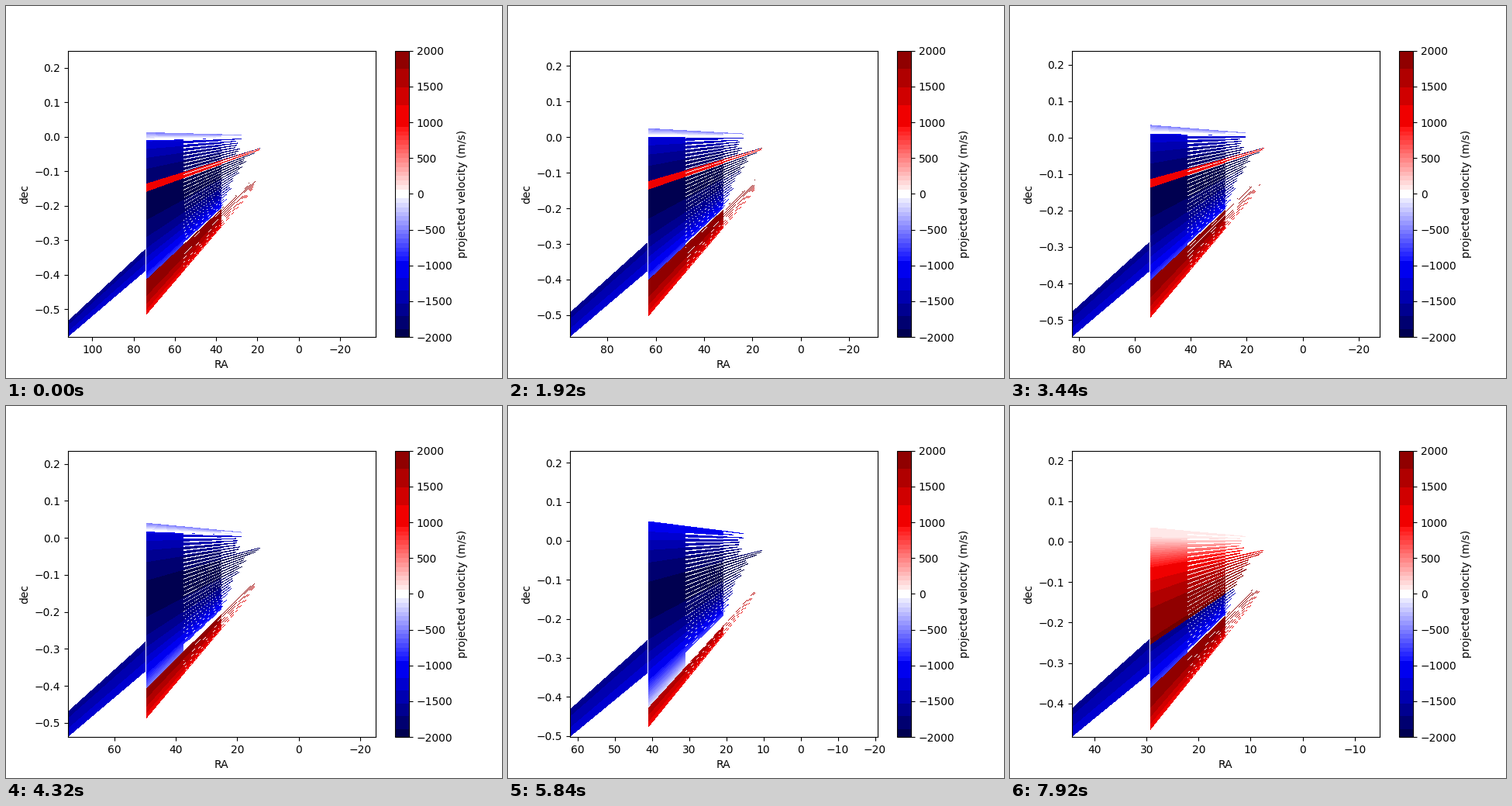
A matplotlib script that plays this animation: 640 by 480 pixels, repeating every 8000 ms.

```python
import numpy as np
import matplotlib.pyplot as plt
from matplotlib.animation import FuncAnimation
from matplotlib.cm import ScalarMappable
from matplotlib.colors import ListedColormap, Normalize

FRAMES, INTERVAL = 100, 80
DRIFT = 0.00052      # upward drift of every ray slope per frame
SPACING = 0.0147     # slope between neighbouring rays
Q_TOP, Q_BOTTOM = 0.012, -0.5215
LONGEST = -0.145     # slope of the ray that reaches furthest in
COLS, ROWS = 397, 370


def stepped_color(v):
    """Blue-white-red map with coarse colour steps."""
    t = abs(v) / 1000
    if t < 0.9375:
        weak = np.floor(255 * (1 - t) / 16) * 16 + 8
        weak, strong = (255 if weak > 240 else weak), 255
    else:
        fall = 127.5 if v > 0 else 178.5
        level = 255 - max(t - 1, 0) * fall
        weak, strong = 0, np.floor(level / 32) * 32 + 16
    rgb = (strong, weak, weak) if v > 0 else (weak, weak, strong)
    return np.array(rgb) / 255


def stage(n, *steps):
    """Value of the last (start, value) step that has begun by frame n."""
    return [value for start, value in steps if n >= start][-1]


def blue_rays(q):
    return -1950 + 24000 * (q + 0.195) ** 2


def pale_cap(q):
    return -26000 * np.maximum(q + 0.008, 0)


def red_rays(q):
    rise = np.clip((-0.03 - q) / 0.28, 0, 1)
    return np.maximum(2000 * np.sin(np.pi / 2 * rise), 120)


def low_red_rays(q):
    return 2000 - 1000 * ((-0.41 - q) / (-0.41 - Q_BOTTOM)) ** 2


def ray_mask(q, u, edge):
    """Solid near the front, striped further in, thin broken rays at the end."""
    place = (Q_TOP - q) / SPACING
    ray, phase = np.floor(place), place % 1
    jitter = (np.sin(ray * 12.9898) * 43758.5453) % 1

    wide = np.clip(0.65 - 0.9 * q, 0, 0.94)
    wide[q > -0.012] = 1
    narrow = 0.5 - 0.8 * np.abs(q - LONGEST)
    end = np.where(q > LONGEST + SPACING, 0.37, 0.25 + 0.9 * np.maximum(LONGEST - q, 0))
    end[q < edge] = 0.26
    end += 0.07 * jitter * (np.abs(q - LONGEST) > SPACING)

    gap = max(0.006, 0.8 * (-0.41 - edge))
    split = (u < 0.75) & (q > edge) & (q < edge + gap)
    striped = (u > 0.5) & (phase < wide)
    thin = (u > end) & (phase < narrow)
    return (u > 0.75) | ((striped | thin) & ~split)


def fan(n, u, slope):
    q = slope - DRIFT * n
    edge = stage(n, (0, -0.418), (48, -0.439), (62, -0.470), (79, -0.418))
    top = stage(n, (0, Q_TOP), (79, -0.159), (92, -0.017))

    v = blue_rays(q)
    if n < 64:
        v = np.where(q > -0.012, pale_cap(q), v)
    if n < 48:
        v = np.where(np.abs(q + 0.15) < 0.012, 1100, v)
    if n >= 92:
        v = np.where(q > -0.309, red_rays(q), v)
    v = np.where(q < edge, low_red_rays(q), v)

    inside = (u < 0.993) & (u > 0.24) & (q <= top) & (q >= Q_BOTTOM)
    return np.where(inside & ray_mask(q, u, edge), v, np.nan)


def strip_edge(n, u, lower):
    """Dec of the outer strip's upper or lower edge; whole rays drop out."""
    first, second = n >= 12, n >= 64
    if lower:
        near, far = -0.391 + 0.012 * second, -0.5805 + 0.0205 * second
    else:
        lost = first + int(second)
        near, far = -0.327 + 0.0165 * lost, -0.534 + 0.0225 * lost
    return near + (far - near) * (u - 1) / 0.5 + DRIFT * n * u


def velocity(n, u, dec):
    upper, lower = strip_edge(n, u, False), strip_edge(n, u, True)
    strip = (u > 0.998) & (dec <= upper) & (dec >= lower)
    depth = (upper - dec) / (upper - lower)
    return np.where(strip, -1650 + 450 * depth, fan(n, u, dec / u))


cmap = ListedColormap([stepped_color(v) for v in np.linspace(-2000, 2000, 512)])
cmap.set_bad("white")
norm = Normalize(-2000, 2000)

fig, ax = plt.subplots(figsize=(6.4, 4.8), dpi=100)
fig.colorbar(ScalarMappable(norm, cmap), ax=ax, label="projected velocity (m/s)")
ax.set_xlabel("RA")
ax.set_ylabel("dec")
image = ax.imshow(np.full((ROWS, COLS), np.nan), cmap=cmap, norm=norm,
                  aspect="auto", interpolation="nearest")

# u is RA as a share of the fan's reach, so its grid never changes
u_axis = 1.5 - 2 * (np.arange(COLS) + 0.5) / COLS
rows = (np.arange(ROWS) + 0.5) / ROWS


def update(n):
    reach = 74.55 - 0.4545 * n
    top = 0.2493 - 0.00025 * n
    bottom = strip_edge(n, 1.5, True)
    u, dec = np.meshgrid(u_axis, top + (bottom - top) * rows)
    image.set_data(np.ma.masked_invalid(velocity(n, u, dec)))
    image.set_extent((1.5 * reach, -0.5 * reach, bottom, top))
    ax.set_xlim(1.5 * reach, -0.5 * reach)
    ax.set_ylim(bottom, top)
    return [image]


anim = FuncAnimation(fig, update, frames=FRAMES, interval=INTERVAL,
                     repeat=True, repeat_delay=0, blit=False)
plt.show()
```
